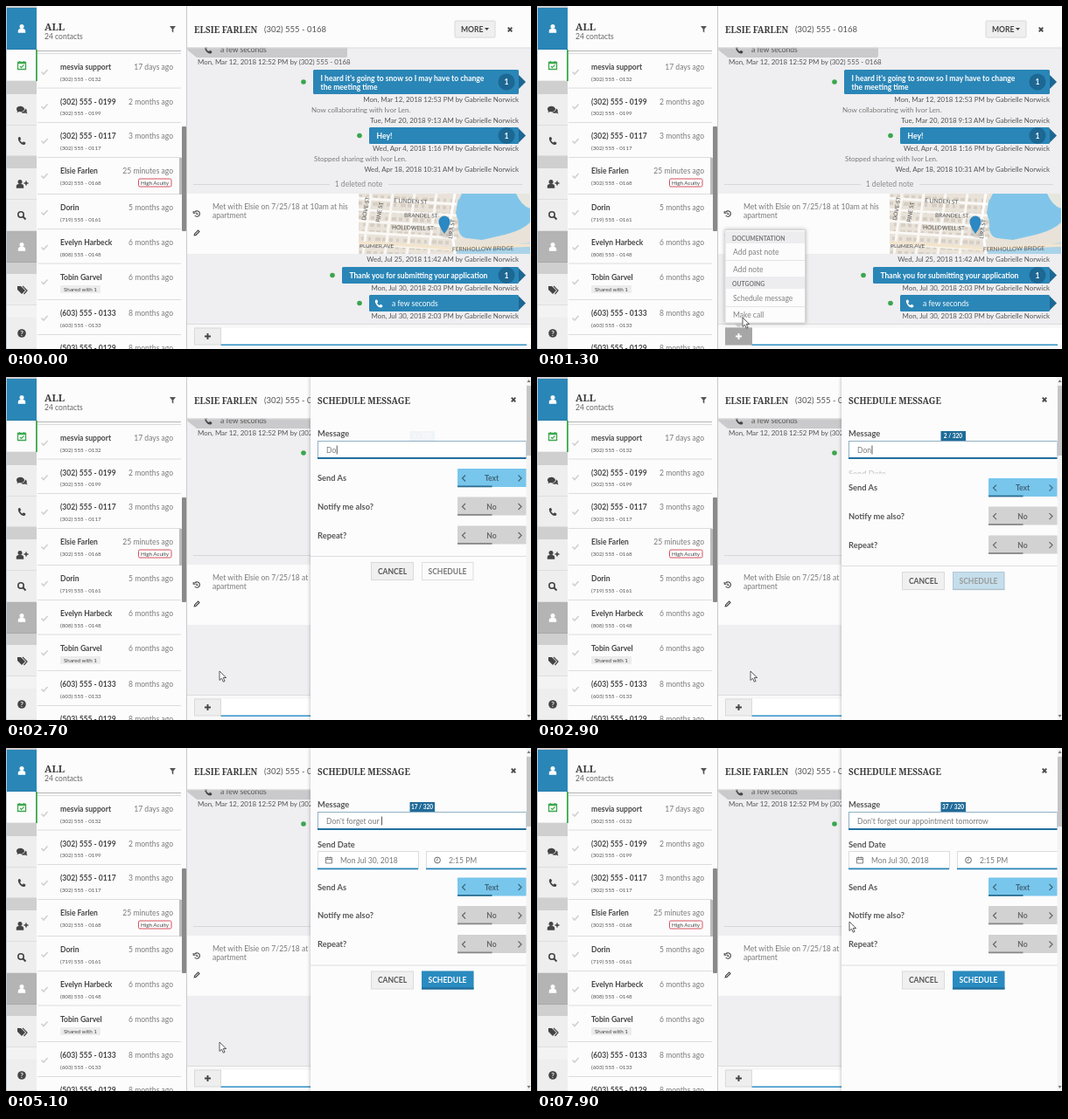
Recreate the animation shown at these times as an HTML page. Size 600 by 393 pixels, loop 8000 ms.

```html
<!DOCTYPE html>
<html lang="en">
<head>
<meta charset="utf-8">
<title>Schedule message</title>
<style>
html, body { margin: 0; width: 100%; height: 100%; overflow: hidden; background: #fff; }
svg { display: block; width: 600px; height: 393px; font: 8.55px Lato, sans-serif; }
text { white-space: pre; }
.b { font-weight: bold; }
.serif { font: bold 9.9px "Noto Serif", serif; }
.end { text-anchor: end; }
.mid { text-anchor: middle; }
</style>
</head>
<body>
<svg id="stage" viewBox="0 0 600 393"></svg>
<script>
const BLUE = '#2a86b7', NAVY = '#1d6793', DARK = '#464646', MID = '#7a7a7a', PAPER = '#fdfcfd';
const PHONE = '(302) 555 - 0168', AGENT = 'Gabrielle Norwick';

const text = (x, y, s, fill = DARK, cls = '', size = '', id = '') =>
  `<text x="${x}" y="${y}" fill="${fill}" class="${cls}"${size && ` style="font-size:${size}px"`}${id && ` id="${id}"`}>${s}</text>`;
const rect = (x, y, w, h, fill, extra = '') =>
  `<rect x="${x}" y="${y}" width="${w}" height="${h}" fill="${fill}" ${extra}/>`;
const path = (d, fill, extra = '') => `<path d="${d}" fill="${fill}" ${extra}/>`;
const line = (d, stroke, w = 1) => path(d, 'none', `stroke="${stroke}" stroke-width="${w}"`);
const dot = (x, y, r, fill, extra = '') => `<circle cx="${x}" cy="${y}" r="${r}" fill="${fill}" ${extra}/>`;
const group = (id, body) => `<g id="${id}">${body}</g>`;
const at = (x, y, body) => `<g transform="translate(${x} ${y})">${body}</g>`;

const icons = {
  person: c => dot(0, -2.5, 2.5, c) + path('M-4.2 4.8v-2q0-2.8 2.8-2.8h2.8q2.8 0 2.8 2.8v2z', c),
  calendar: c => line('M-4.5-3.5h9v8h-9zM-4.5-2.5h9M-2.5-5v2M2.5-5v2', c, 1.3) + line('M-2 1l1.5 1.5L2.5-.5', c, 1.2),
  date: c => line('M-3.5-3h7v6.5h-7zM-3.5-1h7M-1.5-4v2M1.5-4v2', c, .8),
  clock: c => dot(0, 0, 3.4, 'none', `stroke="${c}"`) + line('M0-2v2.3h-1.5', c, .8),
  chat: c => path('M-6-1a4.5 3.2 0 1 1 3 3l-2.5 1.3.6-1.7q-1.1-1-1.1-2.6z', c) + path('M4-1.5q2.5 1.5 1.5 4l1 2-2.7-1q-3 .7-4.8-1 4.5 0 5-4z', c),
  phone: c => path('M-4.2-3.2q1-1.8 2.4-1l1 2.2-1.2 1.2q1 2 2.8 2.8l1.3-1.2 2.2 1.2q.5 1.8-1.3 2.5-2.5.6-5-2.2t-2.2-5.5z', c),
  addUser: c => at(-2, 0, icons.person(c)) + line('M2.5-1h5M5-3.5v5', c, 1.5),
  search: c => dot(-1, -1, 3.2, 'none', `stroke="${c}" stroke-width="1.6"`) + line('M1.5 1.5l3 3', c, 2),
  tags: c => path('M-5-4h4l5 5-4 4-5-5z', c) + line('M1-4l5 5-3.5 4', c, 1.2),
  help: c => dot(0, 0, 4.8, c) + text(0, 2.8, '?', '#eee', 'b mid', 8),
  history: c => line('M-2.5-1.7A3.2 3.2 0 1 1-2.3 2M-3.8-3v2.3h2.3M0-1.5v2h1.5', c, 1.1),
  pencil: c => line('M-2.8 2.8l.4-1.8 4-4 1.4 1.4-4 4z', c, 1.1),
  cross: c => line('M-2.3-2.3l4.6 4.6M2.3-2.3l-4.6 4.6', c, 1.8),
  plus: c => line('M-3.5 0h7M0-3.5v7', c, 1.9),
  check: c => line('M-3.5 0l2.5 2.5 4.5-5', c, 1.6),
};
const icon = (name, x, y, c = '#444') => at(x, y, icons[name](c));

function rail() {
  const gray = '#efeeef';
  const buttons = [
    [2, 48, BLUE, 'person', '#fff'], [50, 36, PAPER, 'calendar', '#3ba84c'],
    [101, 36, gray, 'chat'], [137, 35, gray, 'phone'],
    [186, 36, gray, 'addUser'], [222, 36, gray, 'search'],
    [258, 36, '#b4b4b4', 'person', '#fff'], [307, 36, gray, 'tags'], [357, 36, gray, 'help'],
  ];
  return rect(0, 0, 35, 393, '#d0cfd0') + rect(0, 343, 35, 14, '#f4f3f4') + buttons.map(([y, h, bg, name, c]) =>
    rect(1, y, 34, h, bg) + line(`M1 ${y + h - .5}h34`, '#0001') + icon(name, 18, y + h / 2, c)).join('')
    + rect(34, 50, 1.8, 36, '#3ba84c') + rect(0, 0, 1, 393, '#b4cbda');
}

function contactList() {
  const rows = [
    [73, 'mesvia support', '(302) 555 - 0132', '17 days'],
    [112.5, '(302) 555 - 0199', '(302) 555 - 0199', '2 months'],
    [152, '(302) 555 - 0117', '(302) 555 - 0117', '3 months'],
    [192, 'Elsie Farlen', PHONE, '25 minutes'],
    [234, 'Dorin', '(719) 555 - 0161', '5 months'],
    [274, 'Evelyn Harbeck', '(808) 555 - 0148', '6 months'],
    [313.5, 'Tobin Garvel', '', '6 months'],
    [355, '(603) 555 - 0133', '(603) 555 - 0133', '8 months'],
    [395, '(503) 555 - 0129', '', '8 months'],
  ];
  return rect(35, 0, 171, 393, PAPER) + rows.map(([y, name, phone, ago]) =>
    line(`M36 ${y - 18.5}h164`, '#dcdcdc') + icon('check', 44, y + 2.5, '#d0d0d0')
    + text(62, y, name, DARK, 'b') + text(62, y + 12.5, phone, '#555', '', 6.25)
    + text(191, y, ago + ' ago', MID, 'end')).join('')
    + rect(151.5, 198, 37.5, 9, PAPER, 'rx="1.5" stroke="#d5505f"') + text(170, 205, 'High Acuity', '#444', 'mid', 6.3)
    + rect(62, 320, 46, 9, '#ececec', 'rx="1"') + text(85, 327, 'Shared with 1', '#444', 'mid', 6.3)
    + rect(198, 174, 3, 42, '#bdbcbd') + rect(201, 138, 5, 120, '#8a8a8a', 'rx="1"')
    + rect(35, 1, 165, 50, PAPER) + line('M35 51.5h165', '#b5b5b5')
    + text(44, 27.5, 'ALL', '#3c3c3c', 'serif', 11.2) + text(44, 38, '24 contacts', '#666')
    + path('M187 23h7l-2.7 3.5v4l-1.6-1.3v-2.7z', '#555');
}

function bubble(x, y, h, lines, count = true) {
  const mid = y + h / 2;
  return path(`M586 ${mid - 8}l8 8-8 8z`, NAVY) + rect(x, y, 586 - x, h, BLUE, 'rx="1.5"')
    + dot(x - 11, mid, 2.8, '#3aa64d')
    + lines.map((s, i) => text(x + 8.5, y + 13 + i * 10, s, '#fff', 'b')).join('')
    + (count ? dot(572, mid, 9.5, NAVY) + text(572, mid + 3, 1, '#fff', 'b mid') : '');
}

function map() {
  let houses = '';
  for (let row = 0; row < 9; row++)
    for (let col = 0; col < 15; col++)
      houses += rect(404 + col * 8 - row, 216 + row * 8 + col * .4, 3 + (row * 5 + col * 7) % 4, 4, '#d6cec3');
  const label = (x, y, turn, s) => `<g transform="translate(${x} ${y}) rotate(${turn})">${text(0, 0, s, '#555', '', 6.5)}</g>`;
  const streets = [0, 1, 2, 3, 4].map(i => `M400 ${220 + i * 13}l115 7`).join('')
    + [0, 1, 2, 3].map(i => `M${417 + i * 25} 215l-9 70`).join('');
  return `<clipPath id="frame">${rect(403, 215, 196, 69, '#000')}</clipPath><g clip-path="url(#frame)">`
    + rect(403, 215, 196, 69, '#e8e2d9') + houses + line(streets, '#faf8f5', 3)
    + path('M521 215l-5 10-2 12 3 10 0 9q2 9 9 10l18 2 26-6q20-5 29-14v-33z', '#80c5e9')
    + path('M514 284l4-7q30 3 81-6v13z', '#a9d3e8')
    + path('M583 215h16v17q-10-3-16-17z', '#e6e8df')
    + line('M403 271q60 3 107 7l89-4', '#f3e5cd', 3.5) + line('M513 215l-5 30 5 39', '#fff', 3)
    + label(411, 246, -80, 'DOVE ST') + label(427, 248, -80, 'PINE ST') + label(443, 225, 3, 'E LINDEN ST')
    + label(455, 242, 1, 'BRANDEL ST') + label(441, 256, 1, 'HOLLOWELL ST') + label(404, 277, 0, 'PLUMER AVE')
    + label(510, 267, -82, 'LIRA ST') + label(510, 281, -1, 'FERNHOLLOW BRIDGE')
    + dot(503, 259, 7, '#7773') + path('M501 261q-6.5-9-6.5-14a6.5 6.5 0 1 1 13 0q0 5-6.5 14z', '#2b88c2') + '</g>';
}

function thread() {
  const stamps = [
    [110, 'Mon, Mar 12, 2018 12:53 PM'], [134, 'Tue, Mar 20, 2018 9:13 AM'], [166, 'Wed, Apr 4, 2018 1:16 PM'],
    [190, 'Wed, Apr 18, 2018 10:31 AM'], [293, 'Wed, Jul 25, 2018 11:42 AM'],
    [326, 'Mon, Jul 30, 2018 2:03 PM'], [357.5, 'Mon, Jul 30, 2018 2:03 PM'],
  ];
  return rect(206, 0, 394, 393, '#efeef0')
    + path('M206 47h184v10q0 2-2 2H218l-10-8z', '#cacacc') + icon('phone', 231, 50) + text(245, 53, 'a few seconds', '#555')
    + text(219, 67, 'Mon, Mar 12, 2018 12:52 PM by ' + PHONE, '#555', '', 7.9)
    + stamps.map(([y, s]) => text(586, y, `${s} by ${AGENT}`, '#555', 'end', 7.9)).join('')
    + bubble(351, 73, 28, ["I heard it's going to snow so I may have to change", 'the meeting time'])
    + text(349, 122, 'Now collaborating with Ivor Len.', MID, '', 8)
    + bubble(415, 139, 19, ['Hey!']) + text(352, 178, 'Stopped sharing with Ivor Len.', MID, '', 8)
    + line('M214 204.5h156M437 204.5h153', '#d8d7d8') + text(403, 207, '1 deleted note', '#8a8a8a', 'mid')
    + rect(206, 215, 394, 69, PAPER) + icon('history', 218, 238) + icon('pencil', 218, 260)
    + text(236, 232.5, 'Met with Elsie on 7/25/18 at 10am at his', MID) + text(236, 243, 'apartment', MID) + map()
    + bubble(384, 299, 19, ['Thank you for submitting your application'])
    + bubble(415, 331, 19, [], false) + icon('phone', 426, 341, '#fff') + text(441, 344, 'a few seconds', '#fff')
    + rect(206, 0, 394, 47.5, PAPER) + line('M206 48h394', '#dedede')
    + text(215, 30.5, 'ELSIE FARLEN', '#3c3c3c', 'serif') + text(295, 30, PHONE, '#555', '', 9.5)
    + rect(513, 17, 46, 19, '#efefef', 'rx="1" stroke="#d9d9d9"') + text(520, 30, 'MORE', '#444', 'b')
    + path('M547 25h5l-2.5 3z', '#444') + icon('cross', 576, 27)
    + rect(206, 364, 394, 29, '#f9f8f9') + line('M206 364.5h394', '#dcdcdc') + rect(245, 369, 355, 19, '#fff')
    + rect(245, 387.5, 350, 1.5, '#3091c6')
    + group('plusLight', rect(215.5, 369, 30, 19, '#efeeef', 'stroke="#d9d9d9"') + icon('plus', 230.5, 378.5))
    + group('plusDark', rect(215, 368.5, 31, 20, '#a6a6a6') + icon('plus', 230.5, 378.5, '#fff'))
    + line('M206.5 0v393', '#c9c9c9');
}

function menu() {
  const head = (y, s) => rect(216, y, 90, 14, '#edecee') + text(223, y + 11, s, '#777', 'b', 6.8);
  const rows = [[285, 'Add past note'], [304.5, 'Add note'], [338, 'Schedule message'], [357, 'Make call']];
  return path('M225 363h11l-5.5 6z', '#d4d4d4')
    + rect(215, 256.5, 91.5, 106.5, PAPER, 'stroke="#d6d6d6" filter="url(#shadow)"')
    + head(258, 'DOCUMENTATION') + head(310, 'OUTGOING') + line('M216 291.5h90M216 344.5h90', '#e4e4e4')
    + rows.map(([y, s]) => text(224, y, s, '#828282')).join('')
    + group('picked', rect(216, 325, 90, 19, 'none', 'stroke="#62a9d6"'));
}

function panel() {
  const label = (y, s) => text(356, y, s, '#555', 'b', 9.3);
  const toggle = (y, name, value, bg, c, bar) => label(y, name)
    + rect(516, y - 14, 79, 21, bg, 'rx="1"') + rect(516, y + 5.5, 39.5, 1.8, bar)
    + text(555, y, value, c, 'b mid') + line(`M525 ${y - 6.5}l-3.5 3.5 3.5 3.5M585.5 ${y - 6.5}l3.5 3.5-3.5 3.5`, c, 1.2);
  const dateBox = (x, name, s) => rect(x + .5, 118.5, 115, 20, '#fff', 'stroke="#ddd"') + rect(x, 137.5, 115, 1.8, '#2d87b9')
    + icon(name, x + 13, 128.5, '#666') + text(x + 26, 132, s, MID);
  return rect(348, 0, 262, 393, PAPER, 'filter="url(#shadow)"')
    + text(356, 30.5, 'SCHEDULE MESSAGE', '#3c3c3c', 'serif') + icon('cross', 580, 26)
    + label(68, 'Message')
    + rect(356.5, 73.5, 238, 20, '#fff', 'id="field"') + rect(356, 92, 239, 2, '#aaa', 'id="underline"')
    + text(366, 87, '', MID, '', '', 'typed') + rect(0, 78.5, .8, 10, '#333', 'id="caret"')
    + group('badge', rect(461.5, 62, 28.5, 11, '#1f6b98') + text(475.5, 70, '', '#fff', 'b mid', 6.5, 'count'))
    + group('dates', label(114, 'Send Date') + dateBox(356, 'date', 'Mon Jul 30, 2018') + dateBox(480, 'clock', '2:15 PM'))
    + group('lower', rect(348, 100, 246, 293, PAPER)
      + toggle(119, 'Send As', 'Text', '#78c6ec', '#3f6478', '#2b6d91')
      + toggle(151.5, 'Notify me also?', 'No', '#d2d2d2', '#666', '#888')
      + toggle(184.5, 'Repeat?', 'No', '#d2d2d2', '#666', '#888')
      + line('M348 205.5h252', '#ddd')
      + rect(417.5, 212.5, 48, 20, '#f0f0f0', 'stroke="#dadada"') + text(441.5, 225.5, 'CANCEL', '#555', 'b mid')
      + rect(475.5, 212.5, 58.5, 20, '#fbfbfb', 'stroke="#ddd"') + text(504.5, 225.5, 'SCHEDULE', '#777', 'b mid')
      + group('ready', rect(475, 212, 59.5, 21, '#2a8bc0') + rect(475, 231, 59.5, 2, '#1f6b98') + text(504.5, 225.5, 'SCHEDULE', '#fff', 'b mid')))
    + rect(594.5, 0, 5.5, 393, '#f3f3f3') + rect(595, 10, 5, 80, '#c6c6c6')
    + path('M595.5 6h4l-2-3zM595.5 387h4l-2 3z', '#777');
}

document.getElementById('stage').innerHTML =
  `<filter id="shadow" x="-20%" width="140%"><feDropShadow dx="0" dy="0" stdDeviation="2" flood-opacity=".3"/></filter>`
  + thread() + contactList() + rail() + group('menu', menu()) + group('panel', panel())
  + group('cursor', path('M0 0v10.5l2.5-2.3 1.8 4 1.8-.8-1.8-3.9h3.4z', '#fff', 'stroke="#333" stroke-width=".8"'));

const el = id => document.getElementById(id);
const LOOP = 8000;
const MESSAGE = "Don't forget our appointment tomorrow";
const KEYS = [[2500, 0], [2700, 2], [3600, 7], [3700, 8], [4000, 9], [4200, 10], [4950, 17], [5100, 17],
  [5900, 21], [6000, 22], [6500, 23], [6700, 23], [7500, 37]];
const MOUSE_X = [[300, 330], [750, 228], [1000, 228], [1250, 235], [1350, 235], [1550, 244], [7550, 244], [7850, 357]];
const MOUSE_Y = [[300, 400], [750, 378], [1000, 378], [1250, 357], [1350, 357], [1550, 337], [7550, 337], [7850, 199]];

const ramp = (t, a, b) => Math.min(1, Math.max(0, (t - a) / (b - a)));
function track(keys, t) {
  let value = keys[0][1];
  for (let i = 1; i < keys.length; i++)
    value += (keys[i][1] - keys[i - 1][1]) * ramp(t, keys[i - 1][0], keys[i][0]);
  return value;
}
const typedAt = t => Math.floor(track(KEYS, t) + 1e-6);
const fade = (id, v) => { el(id).style.opacity = v; };
const move = (id, x, y) => el(id).setAttribute('transform', `translate(${x} ${y})`);

function draw(t) {
  const focused = t >= 2450;
  const open = ramp(t, 2850, 3050);

  fade('menu', ramp(t, 900, 1000) - ramp(t, 2350, 2450));
  fade('picked', +(t >= 1600));
  fade('plusDark', +(t >= 850 && t < 1600));
  move('cursor', track(MOUSE_X, t), track(MOUSE_Y, t));

  const slide = 1 - ramp(t, 1700, 2000);
  move('panel', 265 * slide ** 2, 0);
  el('panel').style.display = slide === 1 ? 'none' : '';

  el('field').setAttribute('stroke', focused ? '#8fb0c4' : '#d5d5d5');
  el('underline').setAttribute('fill', focused ? '#206f9f' : '#b0b0b0');
  el('typed').textContent = MESSAGE.slice(0, typedAt(t));
  el('caret').setAttribute('x', 366.5 + el('typed').getComputedTextLength());
  fade('caret', +(focused && t < 7600));
  el('count').textContent = typedAt(t - 100) + ' / 320';
  fade('badge', ramp(t, 2690, 2900));

  fade('dates', open);
  move('lower', 0, 43.5 * open);
  fade('ready', 1 - ramp(t, 2450, 2600) + open);
}

function tick() {
  draw(performance.now() % LOOP);
  requestAnimationFrame(tick);
}
tick();
</script>
</body>
</html>
```
